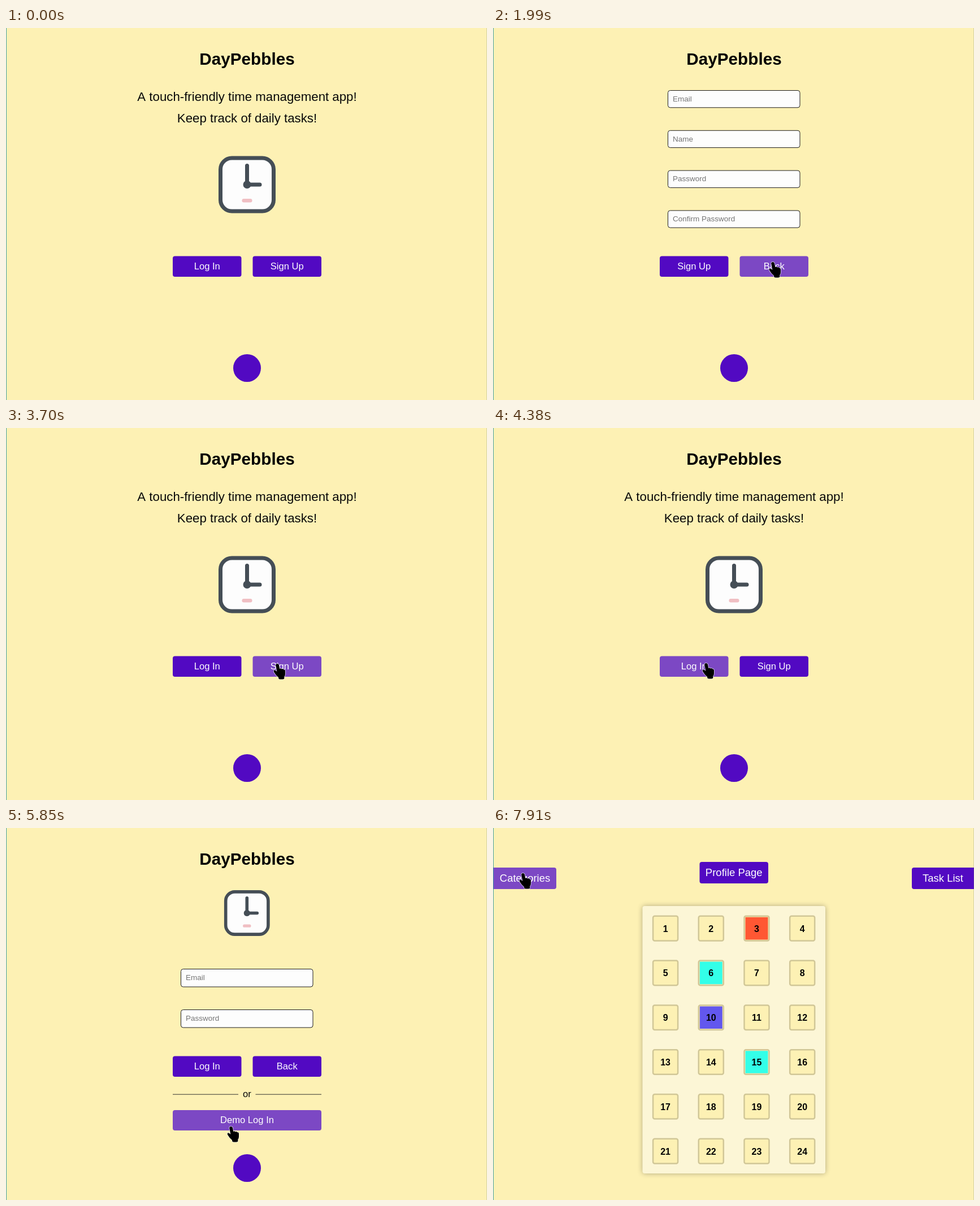
An HTML page with a canvas that plays this animation: 851x658 px, repeating every 8 s.

```html
<!DOCTYPE html>
<html lang="en">
<head>
<meta charset="utf-8">
<title>DayPebbles</title>
<style>
html, body { margin: 0; width: 100%; height: 100%; overflow: hidden; background: #fdf1b4; }
canvas { display: block; }
</style>
</head>
<body>
<canvas id="stage" width="851" height="658"></canvas>
<script>
const ctx = document.getElementById('stage').getContext('2d');
const LOOP = 8000;
const MID = 426.5;
const PAPER = '#fdf1b4', PURPLE = '#5209c2', HOVER = '#7c48c4';
const FAMILY = '"Liberation Sans", Arial, sans-serif';

// Page shown from each time on
const pages = [[0, 'home'], [1990, 'signup'], [3700, 'home'], [4580, 'login'], [6840, 'board']];

// Pointer moves: start, end, steps, x, y
const moves = [
  [340, 340, 1, 350, 614],
  [420, 420, 1, 383, 614],
  [710, 810, 2, 739, 368],
  [1030, 1210, 3, 584, 395],
  [1400, 1400, 1, 568, 400],
  [1490, 1700, 3, 495, 414],
  [2370, 2940, 7, 372, 421],
  [3220, 3520, 4, 480, 417],
  [4100, 4380, 4, 377, 416],
  [5070, 5070, 1, 380, 412.5],
  [5160, 5160, 1, 381, 413],
  [5470, 5850, 5, 398, 528],
  [7240, 7330, 2, 212, 172],
  [7630, 7910, 4, 53, 80]
];

// Buttons: label, x, y, width, height, font size, corner radii
const left = label => [label, 295, 403.5, 121.5, 36.5, 16.6, 4];
const right = label => [label, 436.5, 403.5, 121.5, 36.5, 16.6, 4];
const buttons = {
  home: [left('Log In'), right('Sign Up')],
  signup: [left('Sign Up'), right('Back')],
  login: [left('Log In'), right('Back'), ['Demo Log In', 295, 499, 263, 36, 16.6, 4]],
  board: [
    ['Categories', 1, 70, 111, 38, 18.5, [0, 4, 4, 0]],
    ['Profile Page', 365.5, 60, 121.5, 38, 18.5, 4],
    ['Task List', 741, 70, 110, 38, 18.5, [4, 0, 0, 4]]
  ]
};

const handShape = new Path2D('M-2.8 2.5C-2.6-.8 2.4-.8 3 2.5L4.3 9Q6.2 7.4 8 9.4Q10.4 8.4 11.4 10.4' +
  'Q14 9.8 14 13V18Q14 21 12.3 23V26Q12 27.5 7 27.5Q2.6 27.5 2.3 26L2 24Q-3 20-6 14.5Q-7 11-4 11.4Q-2 12-.6 14Z');
const arrowShape = new Path2D('M0 0V20L4.6 15.8L8.3 24.5L11.8 23L8 14.6H14Z');

function latest(list, t) {
  return list.filter(item => item[0] <= t).pop();
}

function pointerAt(t) {
  const move = latest(moves, t);
  if (!move) return null;
  const [start, end, steps, x, y] = move;
  const prev = moves[moves.indexOf(move) - 1];
  const gap = steps > 1 ? (end - start) / (steps - 1) : 1;
  const step = Math.min(steps, Math.floor((t - start) / gap + 1e-6) + 1);
  const ease = Math.sin(step / steps * Math.PI / 2);
  const px = prev ? prev[3] : x, py = prev ? prev[4] : y;
  return { x: px + (x - px) * ease, y: py + (y - py) * ease, movedAt: start };
}

function isOver(p, [, x, y, w, h]) {
  return p && p.x >= x && p.x <= x + w && p.y >= y && p.y <= y + h;
}

function box(x, y, w, h, r, fill, stroke, line = 1) {
  ctx.beginPath();
  ctx.roundRect(x, y, w, h, r);
  ctx.fillStyle = fill;
  ctx.fill();
  if (stroke) {
    ctx.strokeStyle = stroke;
    ctx.lineWidth = line;
    ctx.stroke();
  }
}

function disc(x, y, r, fill) {
  ctx.beginPath();
  ctx.arc(x, y, r, 0, Math.PI * 2);
  ctx.fillStyle = fill;
  ctx.fill();
}

function write(text, x, y, size, color = '#080808', weight = '', align = 'center') {
  ctx.font = `${weight} ${size}px ${FAMILY}`;
  ctx.textAlign = align;
  ctx.fillStyle = color;
  ctx.fillText(text, x, y);
}

function drawButton(button, p) {
  const [label, x, y, w, h, size, radii] = button;
  box(x, y, w, h, radii, isOver(p, button) ? HOVER : PURPLE);
  // Labels of the two side tabs sit centred on their full width
  write(label, x + w / 2, y + h / 2 + size * 0.33, size, '#fff');
}

function drawField(label, y, h) {
  box(309.5, y + 0.5, 233.5, h - 1, 4, '#fdfdfd', '#1c1c1c');
  write(label, 318, y + h / 2 + 4.2, 13.5, '#757575', '', 'left');
}

function drawClock(cx, cy, scale) {
  const ink = '#454e56';
  ctx.save();
  ctx.translate(cx, cy);
  ctx.scale(scale, scale);
  box(-47, -47, 94, 94, 20, '#fdfdfd', ink, 7);
  ctx.lineCap = 'round';
  ctx.beginPath();
  ctx.moveTo(0, -33.5);
  ctx.lineTo(0, 0);
  ctx.lineTo(22.5, 0);
  ctx.stroke();
  disc(0, 0, 7, ink);
  box(-9, 25, 18, 6.5, 3.2, '#f0bfc3');
  ctx.restore();
}

function drawHeader() {
  write('DayPebbles', MID, 65, 29.7, '#000', 'bold');
  disc(MID, 601.5, 24.5, PURPLE);
}

function drawBoard() {
  const marked = { 3: '#ff5733', 6: '#33ffe8', 10: '#6257ee', 15: '#33ffe8' };
  ctx.save();
  ctx.shadowColor = 'rgba(0,0,0,.3)';
  ctx.shadowBlur = 10;
  box(264.5, 138, 323.5, 473, 4, '#fcf6d6');
  ctx.restore();
  for (let n = 1; n <= 24; n++) {
    const cx = 305.1 + (n - 1) % 4 * 80.7;
    const cy = 177.6 + Math.floor((n - 1) / 4) * 78.8;
    box(cx - 22, cy - 21.8, 44, 43.6, 3, PAPER, '#d1c797', 2.5);
    if (marked[n]) box(cx - 20, cy - 19.8, 40, 39.6, 0, marked[n]);
    write(n, cx, cy + 5.9, 16, '#000', 'bold');
  }
}

const screens = {
  home() {
    drawHeader();
    write('A touch-friendly time management app!', MID, 129, 22.25);
    write('Keep track of daily tasks!', MID, 167, 22.25);
    drawClock(MID, 277, 1);
  },
  signup() {
    drawHeader();
    ['Email', 'Name', 'Password', 'Confirm Password'].forEach((label, i) => drawField(label, 110 + i * 70.8, 31.3));
  },
  login() {
    drawHeader();
    drawClock(426.3, 150.5, 0.8);
    drawField('Email', 249, 32.5);
    drawField('Password', 321, 32.5);
    box(295, 470.5, 116, 1.5, 0, '#77725c');
    box(441.5, 470.5, 116.5, 1.5, 0, '#77725c');
    write('or', MID, 476, 16.6);
  },
  board: drawBoard
};

function drawPointer(p) {
  // The pointer keeps its shape until it next moves
  const page = latest(pages, p.movedAt)[1];
  const shape = buttons[page].some(b => isOver(p, b)) ? handShape : arrowShape;
  ctx.save();
  ctx.translate(p.x, p.y);
  ctx.lineWidth = 1.6;
  ctx.lineJoin = 'round';
  ctx.strokeStyle = 'rgba(255,255,255,.7)';
  ctx.stroke(shape);
  ctx.fillStyle = '#000';
  ctx.fill(shape);
  ctx.restore();
}

function draw(t) {
  const page = latest(pages, t)[1];
  const pointer = pointerAt(t);
  ctx.fillStyle = PAPER;
  ctx.fillRect(0, 0, 851, 658);
  screens[page]();
  buttons[page].forEach(b => drawButton(b, pointer));
  ctx.fillStyle = '#45a0a8';
  ctx.fillRect(0, 0, 1, 658);
  ctx.fillStyle = 'rgba(120,140,120,.3)';
  ctx.fillRect(850, 0, 1, 658);
  if (pointer) drawPointer(pointer);
}

const begin = performance.now();
function tick() {
  draw((performance.now() - begin) % LOOP);
  requestAnimationFrame(tick);
}
tick();
</script>
</body>
</html>
```
